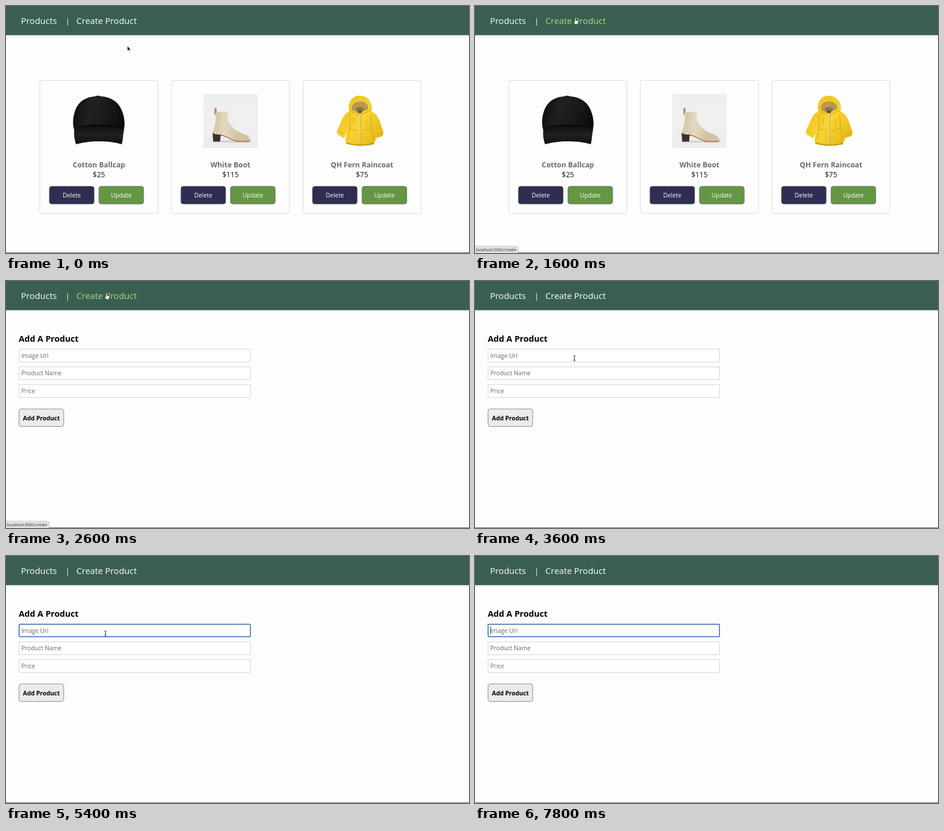
These frames come from a looping animation (800x427 px, 8000 ms). An HTML page with a canvas:

```html
<!DOCTYPE html>
<html lang="en">
<head>
<meta charset="utf-8">
<title>Product list</title>
<style>
  html, body { margin: 0; width: 100%; height: 100%; overflow: hidden; background: #fdfdfd; }
  canvas { display: block; width: 800px; height: 427px; }
</style>
</head>
<body>
<canvas id="stage" width="800" height="427"></canvas>
<script>
const ctx = document.getElementById('stage').getContext('2d');
const LOOP = 8000, STEP = 200;
const SANS = '"Open Sans", sans-serif';

function text(str, x, y, size, color, { weight = 400, align = 'left', family = SANS } = {}) {
  ctx.font = `${weight} ${size}px ${family}`;
  ctx.textAlign = align;
  ctx.fillStyle = color;
  ctx.fillText(str, x, y);
}

function box(x, y, w, h, radius, fill, stroke, lineWidth = 1) {
  ctx.beginPath();
  ctx.roundRect(x, y, w, h, radius);
  if (fill) { ctx.fillStyle = fill; ctx.fill(); }
  if (stroke) { ctx.strokeStyle = stroke; ctx.lineWidth = lineWidth; ctx.stroke(); }
}

function shape(d, fill, stroke, lineWidth = 1) {
  const path = new Path2D(d);
  if (fill) { ctx.fillStyle = fill; ctx.fill(path); }
  if (stroke) { ctx.strokeStyle = stroke; ctx.lineWidth = lineWidth; ctx.stroke(path); }
}

function gradient(x0, y0, x1, y1, ...colors) {
  const g = ctx.createLinearGradient(x0, y0, x1, y1);
  colors.forEach((c, i) => g.addColorStop(i / (colors.length - 1), c));
  return g;
}

function drawCap() {
  const cloth = gradient(116, 170, 205, 190, '#0c0c0d', '#202021', '#19191a', '#0b0b0c');
  shape('M154 158Q154 155 159 155Q164 155 164 158Z', '#19191a');
  shape('M118 215C114 203 116 188 121 177C128 162 142 156 159 156C178 156 192 163 199 178C204 189 207 203 203 216Z', cloth);
  shape('M159 157C157 172 157 190 159 207M154 158C139 166 131 180 128 197M164 158C179 165 190 180 193 197', null, '#29292a', .6);
  shape('M118 213C128 206 142 205 160 205C179 205 193 207 204 213C202 224 202 233 200 239C187 235 174 234 160 234C146 234 132 236 121 239C118 231 117 222 118 213Z',
    gradient(0, 205, 0, 239, '#0c0c0d', '#202021', '#111112'));
  shape('M119 213C129 207 143 206 160 206C179 206 193 208 203 213', null, '#050505', 1);
}

function drawBoot() {
  ctx.fillStyle = gradient(0, 152, 0, 245, '#efefef', '#f1f0f0', '#ececec');
  ctx.fillRect(341, 152, 94, 93.5);
  shape('M357 234Q390 231 424 233L423 236Q389 237 357 235Z', '#d5d2cf');
  shape('M361 188V178Q361 176 363 178V187', null, '#a97850', 1.6);
  shape('M357 219Q364 222 371 221L370 234.5H358Z', '#3b302b');
  shape('M371 223C381 224 390 233 401 234H418Q422 234 421 231', null, '#a45e38', 1.4);
  shape('M362 184Q373 181 384 184C382 194 384 202 389 207C398 218 407 219 417 224Q423 228 420 232Q408 235 397 232C387 229 381 223 371 222Q362 223 357 219C361 207 364 197 362 184Z',
    gradient(358, 205, 402, 215, '#d6c7a6', '#e5dbc3', '#d2c29f'));
  shape('M367 185C369 199 368 211 364 219M384 204C381 212 374 218 368 221', null, '#c6b692', .7);
}

function drawCoat() {
  const cloth = gradient(575, 170, 650, 230, '#edc01b', '#f8d433', '#e6b513');
  shape('M588 232Q611 238 636 231L636 239Q612 245 588 238Z', '#c79a16');
  shape('M592 183C582 187 580 200 574 211Q570 218 573 222L584 229L593 211L594 185Z', cloth);
  shape('M630 182C644 186 646 201 651 214Q654 221 650 225L638 229L630 211Z', cloth);
  shape('M591 183Q611 176 632 183C635 198 637 215 639 233Q627 241 612 239Q598 240 586 234C590 215 591 200 591 183Z', cloth);
  shape('M593 181C590 169 597 156 609 155C623 154 635 165 632 182Q623 184 612 187Q601 185 593 181Z', cloth);
  shape('M598 180C596 170 603 165 612 165C621 165 628 171 625 179Q617 182 611 185Q603 183 598 180Z', '#b99755');
  shape('M603 178Q611 171 620 178L612 185Z', '#92743c');
  shape('M593 181L611 188L630 181M594 187Q596 210 591 231M630 188Q631 211 635 231M574 215L584 222M640 224L650 219', null, '#c99c14', .9);
  shape('M595 213L607 215M618 215L630 212M599 193Q604 197 601 203M625 196Q620 202 624 207', null, '#c99c14', .9);
  shape('M612 185V239', null, '#ead7a0', 1.5);
  shape('M613.2 186V239', null, '#bb9017', .7);
  box(608, 181, 7, 4, 1, '#47524e');
}

const products = [
  { name: 'Cotton Ballcap', price: '$25', draw: drawCap },
  { name: 'White Boot', price: '$115', draw: drawBoot },
  { name: 'QH Fern Raincoat', price: '$75', draw: drawCoat }
];

function drawProducts() {
  products.forEach(({ name, price, draw }, i) => {
    const x = 58.5 + i * 227.3;
    const mid = x + 102;
    box(x, 128.5, 204, 230.3, 4, null, '#d9d9d9');
    draw();
    text(name, mid, 278.5, 12.4, '#6b6b6b', { weight: 700, align: 'center' });
    text(price, mid, 296, 12.4, '#111', { align: 'center' });
    [['Delete', 16.4, '#2f2d52'], ['Update', 102, '#659644']].forEach(([label, dx, fill]) => {
      box(x + dx, 311.7, 77.4, 30.6, 4, fill, '#66706a', .8);
      text(label, x + dx + 38.7, 331.4, 10.4, '#fff', { align: 'center' });
    });
  });
}

function drawForm(focused, caret) {
  text('Add A Product', 22, 105, 14.6, '#000', { weight: 700 });
  ['Image Url', 'Product Name', 'Price'].forEach((label, i) => {
    const y = 117.8 + i * 30.6;
    if (i === 0 && focused) box(22.6, y + .2, 399.8, 21.6, 1.5, '#fff', '#2a66ad', 1.5);
    else box(22.5, y, 400, 22.2, 0, '#fff', '#d4d4d4');
    text(label, 26.4, y + 14.9, 10.4, '#666');
  });
  if (caret) {
    ctx.fillStyle = '#333';
    ctx.fillRect(26.5, 122, 1, 13.5);
  }
  box(22.5, 221.2, 77.3, 30.3, 4, '#ebebeb', '#7d7d7d', .9);
  text('Add Product', 61.1, 240.7, 10.4, '#000', { weight: 700, align: 'center' });
}

function drawHeader(hover) {
  ctx.fillStyle = '#3a5f50';
  ctx.fillRect(0, 0, 800, 50.5);
  text('Products', 26, 31, 15, '#fff');
  text('|', 106.5, 31, 13, '#fff', { align: 'center' });
  text('Create Product', 121.6, 31, 15, hover ? '#a6dc88' : '#fff');
}

function drawStatus() {
  ctx.save();
  ctx.shadowColor = 'rgba(0,0,0,.4)';
  ctx.shadowBlur = 2;
  box(-3, 415.5, 77.5, 15, [0, 2.5, 0, 0], '#dfe0e4');
  ctx.restore();
  text('localhost:3000/create', 1.6, 423.8, 7.1, '#444', { family: 'Roboto, sans-serif' });
}

const pointers = {
  arrow() {
    shape('M0 0V8.2L1.9 6.5L3.1 9.3L4.5 8.7L3.3 6H5.8Z', '#000', '#fff', .6);
  },
  hand() {
    shape('M-1.2 .7Q0 -.6 1.1 .7V4.2L5 5Q6 5.5 5.7 7L4.8 11.6H-.5C-1.5 9.6 -3 8.3 -3.2 6.7Q-2.5 5.5 -1.2 7Z', '#fff', '#111', .8);
    shape('M1.2 7.4V10M2.8 7.4V10M4.2 7.4V9.8', null, '#555', .4);
  },
  beam() {
    shape('M-2 -4.2Q0 -4.2 0 -3Q0 -4.2 2 -4.2M0 -3V3.2M-2 4.4Q0 4.4 0 3.2Q0 4.4 2 4.4M-1 1.6H1', null, '#222', .9);
  }
};

// start, end, then the place reached
const moves = [
  [0, 800, 173.5, 20.5],
  [2800, 3600, 171.8, 133.7],
  [5600, 6400, 479, 108.5],
  [6600, 6800, 597, 33.5]
];

function pointerAt(t) {
  let x = 209.8, y = 69.3;
  for (const [start, end, toX, toY] of moves) {
    const p = Math.min(1, Math.max(0, (t - start) / (end - start)));
    const k = p * p * (3 - 2 * p);
    x += (toX - x) * k;
    y += (toY - y) * k;
  }
  return { x, y };
}

function render(time) {
  const t = Math.floor(time / STEP) * STEP;
  const { x, y } = pointerAt(t);
  const onLink = x > 121 && x < 227 && y < 36;
  const onInput = x < 423 && y > 118 && y < 140;
  const focused = t >= 3800;
  // the caret flips every 500 ms, seen at the next 200 ms step
  const caret = focused && Math.floor((t - 3800) / 500) % 2 === 0;

  ctx.fillStyle = '#fdfdfd';
  ctx.fillRect(0, 0, 800, 427);
  drawHeader(onLink);
  if (t < 2600) drawProducts();
  else drawForm(focused, caret);
  ctx.fillStyle = '#69696b';
  ctx.fillRect(0, 426, 800, 1);
  if (t >= 600 && t < 3400) drawStatus();

  if (t < 7000) {
    ctx.save();
    ctx.translate(x, y);
    pointers[onLink ? 'hand' : onInput ? 'beam' : 'arrow']();
    ctx.restore();
  }
}

const began = performance.now();
function tick() {
  render((performance.now() - began) % LOOP);
  requestAnimationFrame(tick);
}
tick();
</script>
</body>
</html>
```
